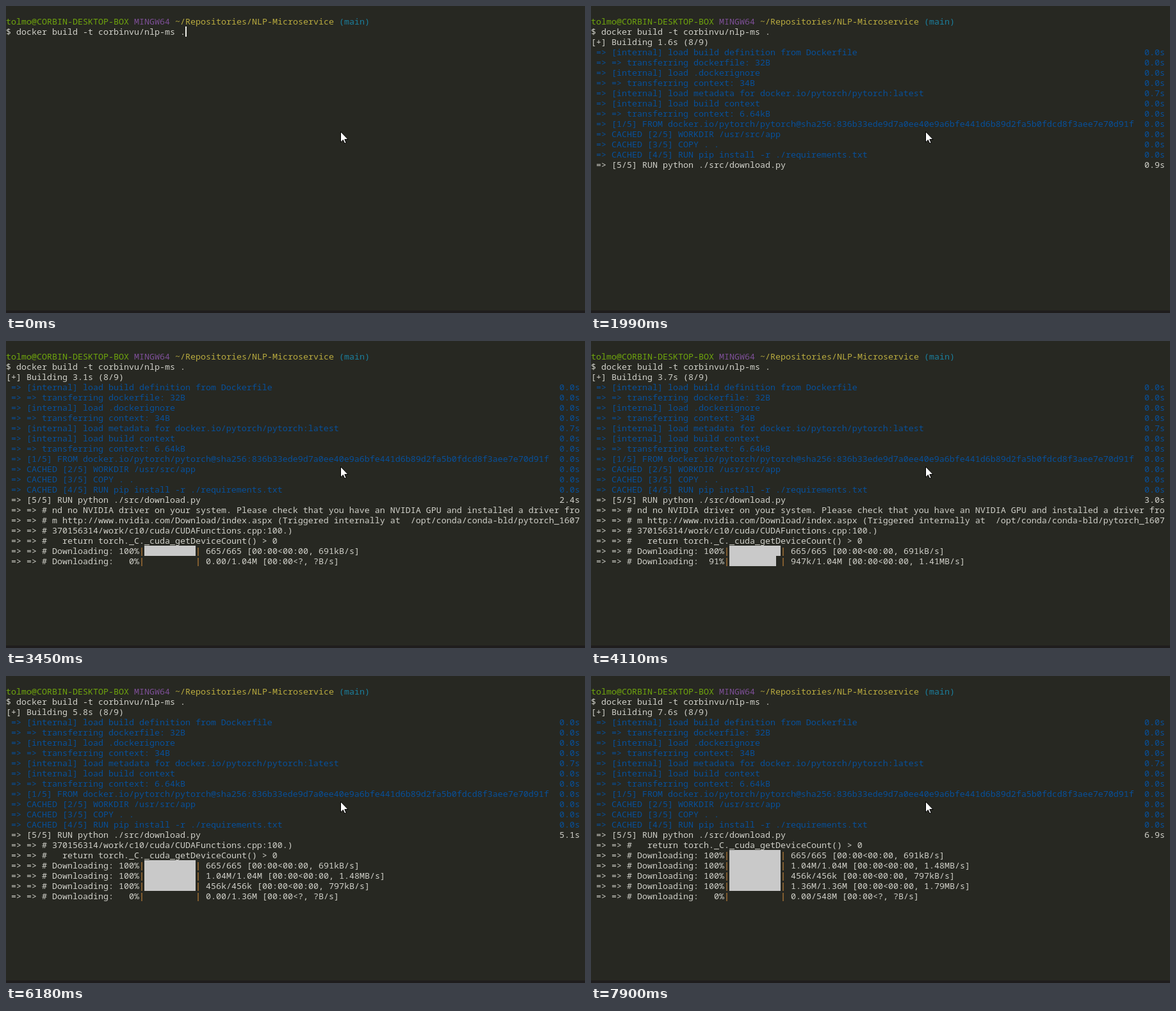
Animation of 904 by 480 pixels, one loop 8 s. Source, as an HTML page with a canvas:

```html
<!DOCTYPE html>
<html lang="en">
<head>
<meta charset="utf-8">
<title>Docker build</title>
<style>
  html, body { margin: 0; width: 100%; height: 100%; overflow: hidden; background: #272822; }
  canvas { display: block; }
</style>
</head>
<body>
<canvas id="term" width="904" height="480"></canvas>
<script>
const ctx = document.getElementById('term').getContext('2d');
const CELL = 8, ROW = 16, LOOP = 8000;
const GREEN = '#70a60d', PURPLE = '#7d4f97', YELLOW = '#b9ab3f', CYAN = '#1b7f9e';
const BLUE = '#07509b', WHITE = '#d0d0c9', BAR = '#c9c9c9', ORANGE = '#dc923e';

// Moments at which the build output is printed again
const ticks = [410, 540, 690, 820, 960, 1100, 1230, 1380, 1560, 1690, 1840, 1990, 2120,
  2300, 2450, 2580, 2745, 2860, 3040, 3190, 3330, 3450, 3600, 3780, 3880, 3960, 4110, 4240,
  4390, 4520, 4700, 4850, 4980, 5130, 5260, 5390, 5540, 5720, 5870, 6000, 6180, 6330, 6510,
  6660, 6790, 6940, 7120, 7270, 7430, 7580, 7780, 7900];
const blinks = [600, 1090, 1900, 2450, 3040, 3540, 4110, 4460, 5000, 5600, 6000, 6420, 6900, 7200, 7580];

const META = 1100, RUN = 1230, LOG = 2745;
const steps = [
  ['[internal] load build definition from Dockerfile', 410],
  ['=> transferring dockerfile: 32B', 410],
  ['[internal] load .dockerignore', 410],
  ['=> transferring context: 34B', 410],
  ['[internal] load metadata for docker.io/pytorch/pytorch:latest', 410, META, 430],
  ['[internal] load build context', META, RUN],
  ['=> transferring context: 6.64kB', META],
  ['[1/5] FROM docker.io/pytorch/pytorch@sha256:836b33ede9d7a0ee40e9a6bfe441d6b89d2fa5b0fdcd8f3aee7e70d91f', META],
  ['CACHED [2/5] WORKDIR /usr/src/app', RUN],
  ['CACHED [3/5] COPY . .', RUN],
  ['CACHED [4/5] RUN pip install -r ./requirements.txt', RUN],
  ['[5/5] RUN python ./src/download.py', RUN, Infinity, 1115],
];
const warning = [
  '/opt/conda/lib/python3.7/site-packages/torch/cuda/__init__.py:52: UserWarning: CUDA initialization: Fou',
  'nd no NVIDIA driver on your system. Please check that you have an NVIDIA GPU and installed a driver fro',
  'm http://www.nvidia.com/Download/index.aspx (Triggered internally at  /opt/conda/conda-bld/pytorch_1607',
  '370156314/work/c10/cuda/CUDAFunctions.cpp:100.)',
  '  return torch._C._cuda_getDeviceCount() > 0',
];
const downloads = [
  { start: LOG, size: 665, rate: 691e3 },
  { start: 3450, size: 1.04e6, rate: 1.48e6 },
  { start: 4850, size: 456e3, rate: 797e3 },
  { start: 6180, size: 1.36e6, rate: 1.79e6 },
  { start: 7900, size: 548e6, rate: 2e6 },
];

const seconds = ms => (Math.round(Math.max(0, ms) * 1.01 / 100) / 10).toFixed(1) + 's';

function scaled(n) {
  let unit = '';
  for (const next of ['k', 'M']) if (n >= 999.5) { n /= 1000; unit = next; }
  return n.toFixed(n < 9.995 ? 2 : n < 99.95 ? 1 : 0) + unit;
}

function text(str, col, row, color = WHITE) {
  ctx.fillStyle = color;
  ctx.fillText(str, col * CELL, row * ROW + 13);
}

function drawPrompt() {
  text('tolmo@CORBIN-DESKTOP-BOX', 0, 1, GREEN);
  text('MINGW64', 25, 1, PURPLE);
  text('~/Repositories/NLP-Microservice', 33, 1, YELLOW);
  text('(main)', 65, 1, CYAN);
  text('$ docker build -t corbinvu/nlp-ms .', 0, 2);
}

function drawStep([label, start, end = 0, clock], row, now) {
  const color = now < end ? WHITE : BLUE;
  const elapsed = clock ? Math.min(now, end) - clock : 0;
  text('=> ' + label, 1, row, color);
  text(seconds(elapsed), 108, row, color);
}

function drawDownload({ start, size, rate }, row, now) {
  const part = Math.min(1, (now - start) / (size / rate * 1000)) ** 1.5;
  const percent = Math.floor(part * 100 + 1e-6);
  const timing = part ? `00:00<00:00, ${scaled(rate * Math.sqrt(part))}B/s` : '00:00<?, ?B/s';
  text('Downloading: ' + String(percent).padStart(3) + '%', 9, row);
  text('|', 26, row, ORANGE);
  text('|', 37, row, ORANGE);
  text(`${scaled(size * part)}/${scaled(size)} [${timing}]`, 39, row);
  ctx.fillStyle = BAR;
  ctx.fillRect(27 * CELL, row * ROW, Math.round(10 * CELL * part), ROW);
}

// Prints the build output and returns the row below it
function drawBuild(now) {
  const done = now < META ? '2/3' : now < RUN ? '4/9' : '8/9';
  text(`[+] Building ${seconds(now - 400)} (${done})`, 0, 3);
  let row = 4;
  for (const step of steps) if (now >= step[1]) drawStep(step, row++, now);
  if (now < LOG) return row;
  const log = [...warning, ...downloads.filter(d => now >= d.start)].slice(-6);
  for (const line of log) {
    text('=> => #', 1, row);
    if (line.size) drawDownload(line, row, now);
    else text(line, 9, row);
    row++;
  }
  return row;
}

const pointer = new Path2D('M522.5 196.5v16.5l3.8-3.6 2.5 5.6 2.4-1-2.4-5.5h5.2z');

function draw(t) {
  ctx.fillStyle = '#272822';
  ctx.fillRect(0, 0, 904, 480);
  ctx.fillStyle = '#1f1d1d';
  ctx.fillRect(0, 476, 904, 4);
  ctx.font = '13.3333px "Noto Sans Mono", monospace';
  drawPrompt();

  const tick = ticks.filter(x => x <= t).pop();
  const typing = t < 30;
  const row = typing ? 2 : tick ? drawBuild(tick) : 3;
  if (blinks.filter(x => x <= t).length % 2 === 0) {
    ctx.fillStyle = '#f0f0ea';
    ctx.fillRect(typing ? 35 * CELL : 0, row * ROW, 2, ROW);
  }

  ctx.fillStyle = '#fff';
  ctx.fill(pointer);
  ctx.strokeStyle = '#000';
  ctx.lineWidth = 1;
  ctx.stroke(pointer);
}

function frame() {
  draw(performance.now() % LOOP);
  requestAnimationFrame(frame);
}
frame();
</script>
</body>
</html>
```
